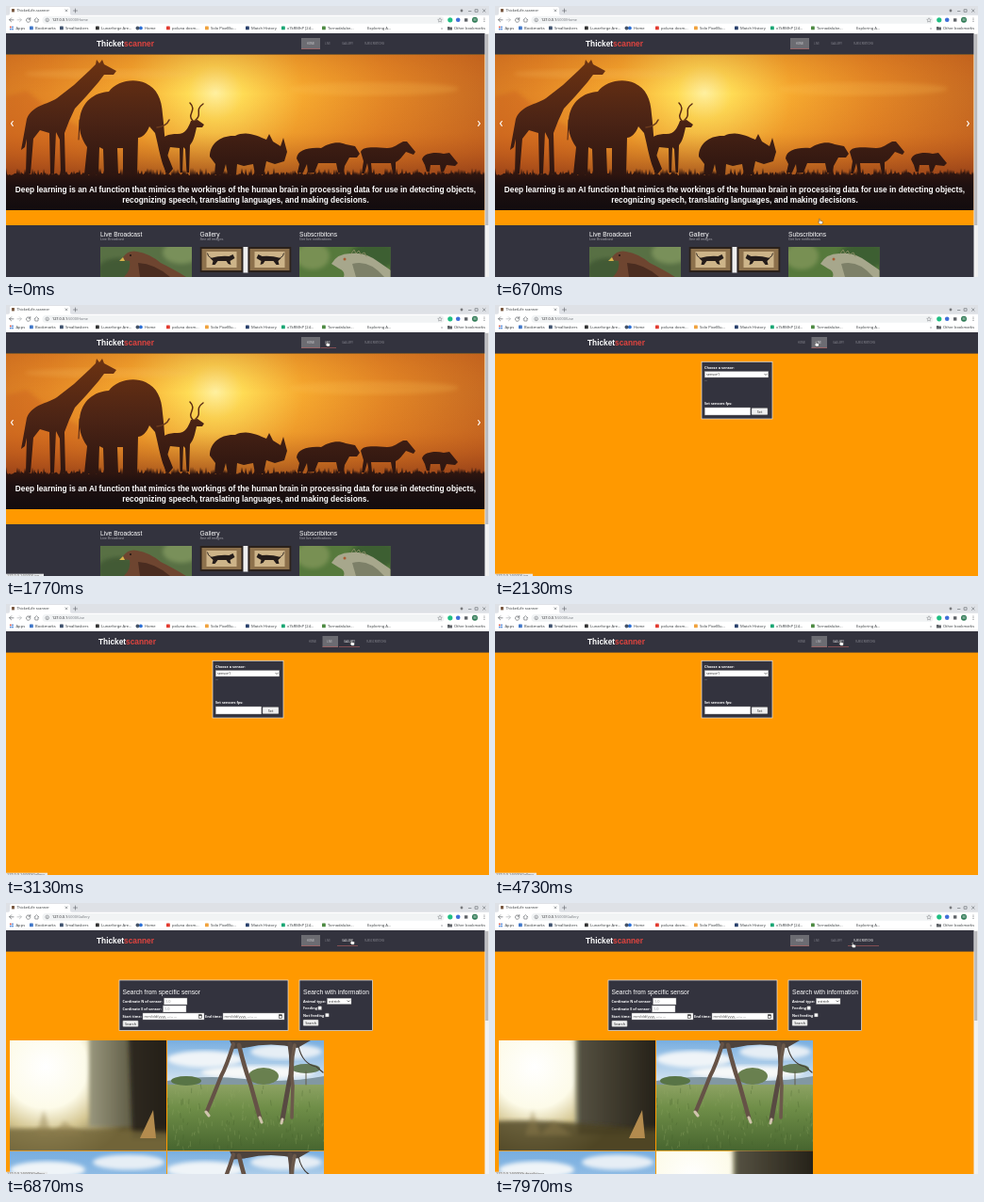
An HTML page that plays this animation: 512x288 px, repeating every 8000 ms.

```html
<!DOCTYPE html>
<html lang="en">
<head>
<meta charset="utf-8">
<title>Thicket scanner</title>
<style>
html, body { margin: 0; width: 100%; height: 100%; overflow: hidden; background: #f90; }
svg { display: block; }
#stage { width: 100vw; height: 100vh; }
text { white-space: pre; }
.ui { font-family: "Noto Sans", "Open Sans", sans-serif; }
.form { font-family: "Open Sans", "Noto Sans", sans-serif; }
.page { font-family: "Liberation Sans", Arial, sans-serif; }
</style>
</head>
<body>
<svg id="stage" viewBox="0 0 512 288" preserveAspectRatio="none" xmlns="http://www.w3.org/2000/svg">
<defs>
  <radialGradient id="sun" gradientUnits="userSpaceOnUse" cx="222" cy="92" r="290">
    <stop offset="0" stop-color="#fff0a0"/><stop offset=".1" stop-color="#ffdc55"/>
    <stop offset=".32" stop-color="#f6a92f"/><stop offset=".62" stop-color="#e38726"/>
    <stop offset="1" stop-color="#c66a22"/>
  </radialGradient>
  <linearGradient id="dusk" x2="0" y2="1">
    <stop offset="0" stop-color="#b24a10" stop-opacity=".25"/><stop offset=".25" stop-color="#d06018" stop-opacity="0"/>
    <stop offset=".5" stop-color="#c04c14" stop-opacity=".15"/><stop offset=".78" stop-color="#7c2c14" stop-opacity=".65"/>
  </linearGradient>
  <linearGradient id="soil" x2="0" y2="1">
    <stop offset="0" stop-color="#38190f"/><stop offset=".4" stop-color="#1e1010"/><stop offset="1" stop-color="#120c0e"/>
  </linearGradient>
  <linearGradient id="beast" gradientUnits="userSpaceOnUse" x1="0" y1="60" x2="0" y2="180">
    <stop offset="0" stop-color="#6b3212"/><stop offset=".5" stop-color="#4c2415"/><stop offset="1" stop-color="#2c1510"/>
  </linearGradient>
  <radialGradient id="glow" gradientUnits="userSpaceOnUse" cx="38" cy="28" r="105">
    <stop offset="0" stop-color="#fff"/><stop offset=".42" stop-color="#fdfbe9"/>
    <stop offset=".65" stop-color="#d5c793"/><stop offset="1" stop-color="#62562f"/>
  </radialGradient>
  <linearGradient id="shade" x2="1" y2="0">
    <stop offset="0" stop-color="#99977d"/><stop offset=".45" stop-color="#66634c"/><stop offset="1" stop-color="#252419"/>
  </linearGradient>
  <linearGradient id="sky" x2="0" y2="1">
    <stop offset="0" stop-color="#78aee0"/><stop offset="1" stop-color="#dfeaf2"/>
  </linearGradient>
  <linearGradient id="grass" x2="0" y2="1">
    <stop offset="0" stop-color="#8da263"/><stop offset=".35" stop-color="#6f8e48"/><stop offset="1" stop-color="#47652f"/>
  </linearGradient>
  <filter id="soft"><feGaussianBlur stdDeviation="2"/></filter>
  <filter id="fuzz"><feGaussianBlur stdDeviation=".6"/></filter>
</defs>
</svg>
<script>
(() => {
const LOOP = 8000;
const DARK = '#33333e';
const stage = document.getElementById('stage');

function seeded(seed) {
  return () => (seed = (seed * 16807) % 2147483647) / 2147483647;
}
function rect(x, y, w, h, fill, more = '') {
  return `<rect x="${x}" y="${y}" width="${w}" height="${h}" fill="${fill}" ${more}/>`;
}
function path(d, fill, more = '') {
  return `<path d="${d}" fill="${fill}" ${more}/>`;
}
function line(d, color, width, more = '') {
  return path(d, 'none', `stroke="${color}" stroke-width="${width}" stroke-linecap="round" stroke-linejoin="round" ${more}`);
}
function dot(x, y, r, fill, more = '') {
  return `<circle cx="${x}" cy="${y}" r="${r}" fill="${fill}" ${more}/>`;
}
function oval(x, y, rx, ry, fill, more = '') {
  return `<ellipse cx="${x}" cy="${y}" rx="${rx}" ry="${ry}" fill="${fill}" ${more}/>`;
}
function text(x, y, size, fill, str, kind = 'ui', more = '') {
  return `<text x="${x}" y="${y}" font-size="${size}" fill="${fill}" class="${kind}" ${more}>${str}</text>`;
}
function layer(html) {
  const g = document.createElementNS('http://www.w3.org/2000/svg', 'g');
  g.innerHTML = html;
  stage.appendChild(g);
  return g;
}
function clip(x, y, w, h, html) {
  return `<svg x="${x}" y="${y}" width="${w}" height="${h}" overflow="hidden">${html}</svg>`;
}
const BOLD = 'font-weight="700"';
const MID = 'text-anchor="middle"';
const SOFT = 'filter="url(#soft)"';
const FUZZ = 'filter="url(#fuzz)"';

// Browser window
function browser() {
  const ink = '#5f6368';
  let s = rect(0, 0, 512, 10, '#dee1e6') + path('M2,10 Q4,10 4,8 V3 Q4,1 6,1 H66 Q68,1 68,3 V8 Q68,10 70,10 Z', '#fff');
  s += rect(0, 9.8, 512, 19.2, '#fff');
  s += rect(6, 3, 3, 3.4, '#7a5a42') + line('M63,3.8 l2,2 m0,-2 l-2,2 M73.5,3 v4 m-2,-2 h4', ink, .6);
  s += dot(483, 5, 1.4, '#77797d') + line('M490.5,5.5 h2.5 M497.5,3.7 h2.6 v2.6 h-2.6 Z M505.5,3.7 l2.6,2.6 m0,-2.6 l-2.6,2.6', ink, .6);
  s += line('M8,14.8 H3.6 l2,-2 m-2,2 l2,2', ink, .7) + line('M12,14.8 h4.4 l-2,-2 m2,2 l-2,2', '#b0b3b7', .7);
  s += line('M25.6,14 a2.2,2.2 0 1 0 .2,1.6 M25.8,12.5 v1.7 h-1.7', ink, .7);
  s += line('M30,14.8 l2.4,-2.2 l2.4,2.2 M30.8,14.6 v2.4 h3.2 v-2.4', ink, .6);
  s += rect(38.5, 11, 426, 7.8, '#f1f3f4', 'rx="3.9"') + dot(43.7, 14.9, 1.8, 'none', `stroke="${ink}" stroke-width=".5"`);
  s += line('M43.7,14.7 v1.2', ink, .5);
  s += path('M460,12.7 l.7,1.5 1.6,.2 -1.2,1.1 .3,1.6 -1.4,-.8 -1.4,.8 .3,-1.6 -1.2,-1.1 1.6,-.2 Z', 'none', `stroke="${ink}" stroke-width=".4"`);
  s += dot(470.8, 14.8, 2.6, '#1fbf83') + dot(479.2, 14.8, 2.3, '#3f6fd8') + rect(486, 13.2, 3.4, 3.4, ink);
  s += dot(497, 14.8, 3, '#2f7a55') + text(497, 16.1, 3.4, '#fff', 'M', 'ui', MID);
  for (const y of [13, 14.8, 16.6]) s += dot(507, y, .5, ink);

  for (const x of [4, 6.2]) for (const y of [21.6, 23.8]) s += rect(x, y, 1.6, 1.6, x + y < 27 ? '#d95040' : '#4a86d8');
  const marks = [
    [10.5, 'Apps'], [31, 'Bookmarks', '#3f76c8'], [63, 'Smalltaskers', '#3f526e'], [101, 'Lunarforge Are...', '#333'],
    [147, 'Home', '#2b6fd6'], [176, 'poluna dosm...', '#e23a2f'], [217, 'Solo PixelBu...', '#f0a23c'],
    [260, 'Match History', '#28406c'], [298, 'x7kRMhP [24...', '#17a673'], [341, 'Tornadalube...', '#4d8a42'], [383, 'Exploring A...']
  ];
  for (const [x, name, color] of marks) {
    if (color) s += rect(x - 6, 21.5, 3.8, 3.8, color, `rx="${name === 'Home' ? 1.9 : .6}"`);
    s += text(x, 25, 4.1, '#3c4043', name);
  }
  s += dot(139.5, 23.4, 2, '#465468');
  s += text(461, 25, 4.2, ink, '»') + path('M468,22 h2 l.6,.6 h2.4 v3 h-5 Z', ink) + text(475, 25, 4, '#3c4043', 'Other bookmarks');
  return s;
}

// Site header; dx is the shift when there is no scrollbar
const NAV = [['HOME', 313, 20, 323], ['LIVE', 333.5, 16.5, 341], ['GALLERY', 351, 22, 362], ['SUBSCRIBTIONS', 374, 33, 390.5]];
function header(dx, active, hover) {
  let s = rect(0, 29, 512, 22.6, DARK);
  s += text(96 + dx, 42.8, 8.3, '#fff', 'Thicket<tspan fill="#e2443f">scanner</tspan>', 'page', BOLD);
  NAV.forEach(([name, x, w, mid], i) => {
    if (i === active) s += rect(x + dx, 34, w, 12, '#6c6c72');
    if (i === active || i === hover) s += rect(x + dx, 45.4, w, .6, '#b9625f');
    s += text(mid + dx, 41, 2.8, i === hover ? '#fff' : i === active ? '#d6d6d8' : '#8d8d96', name, 'form', MID);
  });
  return s;
}

function animals() {
  const shapes = [
    // giraffe
    'M117,69 L114,73 L104,73 L98,81 L85,96 L73,109 L67,122 L62,135 L63,178 H58 L57,142 L53,134 L51,178 H47 L46,135 L36,132 L29,141 L26,178 H21 L22,141 L25,128 L20,150 L16,153 L22,120 C28,105 44,105 54,98 L72,84 L88,69 L95,62 L96,57 L99,61 L102,57 L104,62 Z',
    // elephant
    'M78,121 C80,101 94,92 109,91 C117,80 135,76 148,82 C160,88 165,98 166,115 C168,130 168,146 171,158 L177,173 L172,179 C165,172 162,150 158,135 L152,128 C149,136 144,140 140,140 L139,180 H124 V151 H118 L119,180 H104 L103,152 L99,150 L98,179 H83 L86,150 C79,140 77,130 78,121 Z',
    // antelope
    'M164,146 C165,138 172,136 182,136 C190,136 193,130 196,122 L203,121 L210,126 L208,129 L202,129 C200,138 199,143 195,148 L194,177 H191.5 L190,152 L188,150 L187,177 H184.5 L184,151 L174,150 L171,160 L172,177 H169 L167,160 Z',
    // rhinoceros
    'M216,160 C216,146 228,137 243,138 C254,132 267,138 276,142 L279,136 L283,144 L291,149 L294,140 L298,155 L295,165 L285,168 L276,165 L273,179 H264 L262,168 L252,170 L245,168 L244,179 H235 L233,168 L230,179 H221 L222,168 Z',
    // lion
    'M308,162 C309,153 320,150 334,151 C341,146 352,143 360,147 L370,149 L375,157 L372,161 L364,161 L359,170 L358,177 H352 L350,167 L331,167 L327,177 H320 L319,168 L315,177 H309 L311,168 Z',
    // zebra
    'M376,155 C378,149 390,150 404,151 C412,151 416,146 421,144 L425,144 L434,155 L432,158 L424,155 C420,160 417,164 413,166 L413,178 H410 L408,167 H392 L387,167 L388,178 H385 L383,167 L380,178 H377 L379,165 Z',
    // warthog
    'M441,163 C443,156 455,155 464,157 L470,156 L479,167 L476,170 L467,169 L464,176 H461 L460,169 H450 L449,176 H446 L444,169 Z'
  ];
  return shapes.map(d => path(d, 'url(#beast)')).join('') +
    line('M198,122 C191,115 203,111 195,103 M201,121 C209,115 199,111 209,104', '#5a2a12', 1.5) +
    line('M160,129 Q170,128 173,121', '#6b3a1c', 1.6) + line('M78,121 L77,142', '#4c2415', 1);
}

function ground() {
  const rnd = seeded(41);
  let d = 'M0,217 V176';
  for (let x = 0; x < 508; x += 2) d += ` L${x},${(172 + rnd() * 8).toFixed(1)} L${x + 1},${(177 + rnd() * 3).toFixed(1)}`;
  return path(d + ' L508,176 V217 Z', 'url(#soil)');
}

function eagle() {
  return rect(0, 0, 97, 32, '#587044') + oval(20, 26, 24, 14, '#435a35', SOFT) + oval(86, 6, 20, 12, '#79905a', SOFT) +
    path('M24,11 Q30,3 39,5 Q52,7 64,17 Q80,25 91,32 H25 Q33,24 31,15 L24,14 Z', '#6e4530') +
    path('M40,17 Q58,18 74,32 H42 Z', '#4a2c20') + path('M24,11 L20,15 L26,15 Z', '#d8b24a') + dot(32, 9, 1, '#1e1512');
}
function iguana() {
  return rect(0, 0, 97, 32, '#56793c') + oval(80, 9, 26, 14, '#3d5f30', SOFT) + oval(14, 10, 18, 14, '#789052', SOFT) +
    '<g transform="translate(12 0)">' + path('M22,18 Q28,7 42,7 Q58,5 72,16 L95,32 H35 Q37,26 30,23 Z', '#a7a78c') +
    path('M44,18 Q62,13 78,32 H48 Z', '#7d8068') + dot(36, 13, 1.5, '#a85c32') + line('M43,7 l3,-4 2,4 3,-3 2,4 4,-2 2,4', '#858a60', 1) + '</g>';
}
function cave(flip) {
  const pose = flip ? 'translate(46 0) scale(-1 1)' : '';
  return rect(0, 0, 46, 27, '#2b211b') + rect(2, 2, 42, 23, '#8d714c') + rect(7, 5, 32, 17, '#cdb489') +
    `<g transform="${pose}">` + path('M11,12 Q22,9 31,10 L35,8 L37,12 L32,15 L33,19 L30,18 L28,15 L19,15 L16,19 L13,19 L14,15 Z', '#241c1a') +
    line('M12,12 Q8,10 8,7', '#241c1a', .9) + '</g>';
}

function homePage() {
  let s = clip(0, 51.6, 507.5, 165.4, `<g transform="translate(0 -51.6)">` +
    rect(0, 51.6, 508, 166, 'url(#sun)') + oval(110, 72, 90, 5, '#ffd070', `opacity=".22" ${SOFT}`) +
    oval(390, 88, 90, 7, '#ffcf60', `opacity=".2" ${SOFT}`) + path('M0,96 L22,90 L48,112 L90,135 V180 H0 Z', '#c85a1c', `opacity=".35" ${SOFT}`) +
    rect(0, 51.6, 508, 166, 'url(#dusk)') + animals() + ground() + '</g>');
  const caption = `${BOLD} ${MID}`;
  s += text(254, 197.5, 8.3, '#fff', 'Deep learning is an AI function that mimics the workings of the human brain in processing data for use in detecting objects,', 'page', caption);
  s += text(254, 208.8, 8.3, '#fff', 'recognizing speech, translating languages, and making decisions.', 'page', caption);
  s += line('M7.3,122.5 l-1.8,2.4 1.8,2.4 M500.6,122.5 l1.8,2.4 -1.8,2.4', '#fff', 1.1);
  s += rect(0, 233, 508, 55, DARK);
  const cols = [[100, 'Live Broadcast', 'Live Broadcast'], [205.5, 'Gallery', 'See all images'], [311, 'Subscribitons', 'Get live notifications']];
  for (const [x, title, sub] of cols)
    s += text(x, 244.8, 6.7, '#fff', title, 'page') + text(x, 249.2, 3.8, '#a2a2aa', sub, 'page');
  return s + clip(100, 256, 97, 32, eagle()) + clip(205.5, 256, 46, 27.5, cave()) + rect(251.5, 256, 5, 27.5, '#eee') +
    clip(256.5, 256, 46, 27.5, cave(true)) + clip(311, 256, 96.5, 32, iguana());
}

// Form pieces
function panel(x, y, w, h) {
  return rect(x, y, w, h, DARK, 'stroke="#e6e6ea" stroke-width=".7"');
}
function label(x, y, str) {
  return text(x, y, 3.8, '#fff', str, 'form', BOLD);
}
function field(x, y, w, h, str, color = '#8a8a8a') {
  return rect(x, y, w, h, '#fff', 'stroke="#8c8c8c" stroke-width=".4"') + text(x + 1.6, y + h / 2 + 1.5, 3.9, color, str, 'form');
}
function select(x, y, w, h, str) {
  return field(x, y, w, h, str, '#222') + line(`M${x + w - 4},${y + h / 2 - .5} l1.2,1.2 1.2,-1.2`, '#222', .6);
}
function button(x, y, w, h, str) {
  return rect(x, y, w, h, '#efefef', 'rx=".8" stroke="#777" stroke-width=".4"') + text(x + w / 2, y + h / 2 + 1.4, 3.8, '#222', str, 'form', MID);
}
function dateField(x, y) {
  return field(x, y, 65, 7, 'mm/dd/yyyy, --:-- --', '#444') + rect(x + 59.5, y + 1.8, 3, 3.5, 'none', 'stroke="#333" stroke-width=".6"') + rect(x + 59.5, y + 1.7, 3, 1.2, '#333');
}
function check(x, y) {
  return rect(x, y, 3.8, 3.8, '#fff', 'rx=".6" stroke="#777" stroke-width=".4"');
}

function livePage() {
  return panel(219, 60.3, 75, 60.7) + label(222, 67.6, 'Choose a sensor:') + select(222.3, 70.6, 67.5, 6.4, 'sensor1') +
    rect(222.3, 80.5, 2.5, .5, '#777') + label(222, 105.8, 'Set sensors fps:') + field(222.3, 109, 48.5, 8, '') + button(272, 109.5, 17, 7.2, 'Set');
}
function searchForms() {
  return panel(122, 82, 179, 53.6) + text(125.5, 96.8, 6.7, '#fff', 'Search from specific sensor', 'page') +
    label(125.5, 105.7, 'Cordinate N of sensor:') + field(169.5, 101, 24.5, 7, '1.0') +
    label(125.5, 113.8, 'Cordinate E of sensor:') + field(168.5, 109, 24.5, 7, '1.0') +
    label(125.5, 121.6, 'Start time:') + dateField(147, 117) + label(213, 121.6, 'End time:') + dateField(232, 117) +
    button(125.8, 125, 16.4, 6.5, 'Search') +
    panel(313, 82, 77.5, 53.6) + text(317, 96.8, 6.7, '#fff', 'Search with information', 'page') +
    label(317, 105.6, 'Animal type:') + select(342.5, 101.2, 25.5, 6.3, 'ostrich') +
    label(317, 113, 'Feeding') + check(332.8, 109.8) + label(317, 120.8, 'Not feeding') + check(340.5, 117.2) +
    button(317, 124, 16.2, 6.6, 'Search');
}

// Gallery photos, each 166 by 117
function photo(x, y, html) {
  return clip(x, y, 166, 117, html);
}
function glare(dim) {
  const edge = dim ? 81 : 84;
  return rect(0, 0, 166, 117, 'url(#glow)') + rect(edge, -6, 90, 98, 'url(#shade)', SOFT) +
    path(dim ? 'M84,-6 H172 V100 H84 Z' : 'M126,-6 H172 V104 H130 Z', '#201d14', `opacity="${dim ? .55 : .8}" ${SOFT}`) +
    path(`M-6,${dim ? 86 : 94} Q60,${dim ? 82 : 92} 172,98 V123 H-6 Z`, dim ? '#4b4223' : '#75683b', `opacity=".8" ${SOFT}`) +
    path('M152,74 L155,104 H138 Z', '#b38b4e', FUZZ) +
    path('M28,101 L36,74 L44,100 L58,86 L78,101 Z', '#8d7b4c', `opacity=".45" ${SOFT}`);
}
function clouds() {
  return oval(40, 20, 40, 9, '#eff4f8', SOFT) + oval(126, 12, 38, 8, '#e6eef5', SOFT) + oval(96, 34, 60, 7, '#f6f8f8', SOFT);
}
function savanna(seed) {
  const rnd = seeded(seed);
  let s = rect(0, 0, 166, 50, 'url(#sky)') + clouds() + path('M0,43 Q40,36 82,41 T166,38 V54 H0 Z', '#8298a3');
  s += rect(0, 47, 166, 70, 'url(#grass)') + oval(20, 43, 16, 5, '#587446') + oval(102, 38, 16, 9, '#69804f', FUZZ) + oval(147, 30, 15, 5, '#647a57', FUZZ) + line('M147,33 v14', '#605c48', 1);
  for (let i = 0; i < 160; i++) {
    const x = rnd() * 166, y = 51 + rnd() * 66;
    s += line(`M${x.toFixed(1)},${y.toFixed(1)} l${(rnd() * 2 - 1).toFixed(1)},-${(2 + rnd() * 4).toFixed(1)}`, i % 3 ? '#90a767' : '#425c2a', .5, 'opacity=".6"');
  }
  s += path('M66,0 H152 L138,8 Q110,1 82,8 L70,9 Z', '#4d433d');
  s += line('M70,4 Q63,27 57,38 Q48,61 42,75', '#655246', 4.2) + line('M76,5 Q82,30 88,46 L98,82', '#655246', 4.6) +
    line('M130,4 Q134,28 129,45 L122,84', '#584a42', 5) + line('M135,5 Q130,28 133,48 L132,82', '#6b594b', 3.6) +
    line('M139,6 Q143,25 158,28 L165,34', '#453d36', 1.2);
  return s + line('M41,76 l3,4 M98,82 l2,5 M122,84 l-1,4', '#d0c4ad', 3);
}
function skyPhoto() {
  return rect(0, 0, 166, 117, 'url(#sky)') + clouds();
}

// Layers, back to front
layer(rect(0, 0, 512, 288, '#f90'));
const home = layer(homePage());
const live = layer(livePage());
const forms = layer(searchForms());
const photos = layer(photo(171, 146, savanna(17)) + photo(4, 263.5, skyPhoto()));
const early = layer(photo(4, 146, glare(false)) + photo(171, 263.5, savanna(29)));
const late = layer(photo(4, 146, glare(true)) + photo(171, 263.5, glare(true)));
const masthead = layer('');
layer(browser());
const address = layer('');
const scrollbar = layer('');
const linkHint = layer('');
const hand = layer(path('M0,0 Q.8,-.7 1.1,.2 V2 L3.4,2.4 Q4.2,2.7 4,3.6 L3.5,5.6 H.8 L-1,3.4 Q-.9,2.6 0,3.2 Z', '#fff', 'stroke="#222" stroke-width=".4"'));

const PATHS = ['Home', 'Live', 'Gallery', 'Subscribtions'];
const TIMES = { live: 2130, gallery: 5830, images: 6270, refresh: 7200 };
// Cursor stops: start, end, x, y
const MOVES = [[500, 1000, 339.5, 38.5], [2600, 2950, 365.5, 38.7], [7520, 7850, 378.5, 42]];

function cursorAt(t) {
  let x = 345, y = 296;
  for (const [from, to, nx, ny] of MOVES) {
    const p = Math.min(1, Math.max(0, (t - from) / (to - from)));
    const e = p * p * (3 - 2 * p);
    x += (nx - x) * e;
    y += (ny - y) * e;
  }
  return [x, y];
}
function show(el, on) {
  el.style.display = on ? '' : 'none';
}
let last = '';
function draw(t) {
  const page = t < TIMES.live ? 0 : t < TIMES.gallery ? 1 : 2;
  const loaded = t >= TIMES.images;
  const scrolls = page === 0 || loaded;
  const dx = scrolls ? 0 : 2;
  const [x, y] = cursorAt(t);
  const hover = y < 34 || y > 47 ? -1 : NAV.findIndex(([, left, w]) => x >= left + dx && x < left + dx + w);
  const linked = hover > 0 && t >= 1690;
  hand.setAttribute('transform', `translate(${x.toFixed(2)} ${y.toFixed(2)})`);
  show(home, page === 0);
  show(live, page === 1);
  show(forms, page === 2);
  forms.setAttribute('transform', `translate(${dx - 2} 0)`);
  show(photos, loaded);
  show(early, loaded && t < TIMES.refresh);
  show(late, t >= TIMES.refresh);

  const key = [page, scrolls, hover, linked].join();
  if (key === last) return;
  last = key;
  masthead.innerHTML = header(dx, page === 1 ? 1 : 0, hover);
  address.innerHTML = text(11.5, 6.4, 3.8, '#3c4043', page ? 'ThicketLife scanner' : 'ThicketLife-scanner') +
    text(49, 16.3, 3.8, '#202124', `127.0.0.1<tspan fill="#777b80">:5000/${PATHS[page]}</tspan>`);
  scrollbar.innerHTML = scrolls ? rect(507.5, 29, 4.5, 259, '#f1f1f1') + rect(508.2, 30, 3.1, page ? 95 : 203, '#b9b9bc') : '';
  linkHint.innerHTML = linked ? rect(0, 285.7, hover === 1 ? 40 : 44, 3, '#e6e8ea') + text(1, 289.3, 3.8, '#555', `127.0.0.1:5000/${PATHS[hover]}`) : '';
}
const start = performance.now();
function tick() {
  draw((performance.now() - start) % LOOP);
  requestAnimationFrame(tick);
}
tick();
})();
</script>
</body>
</html>
```
